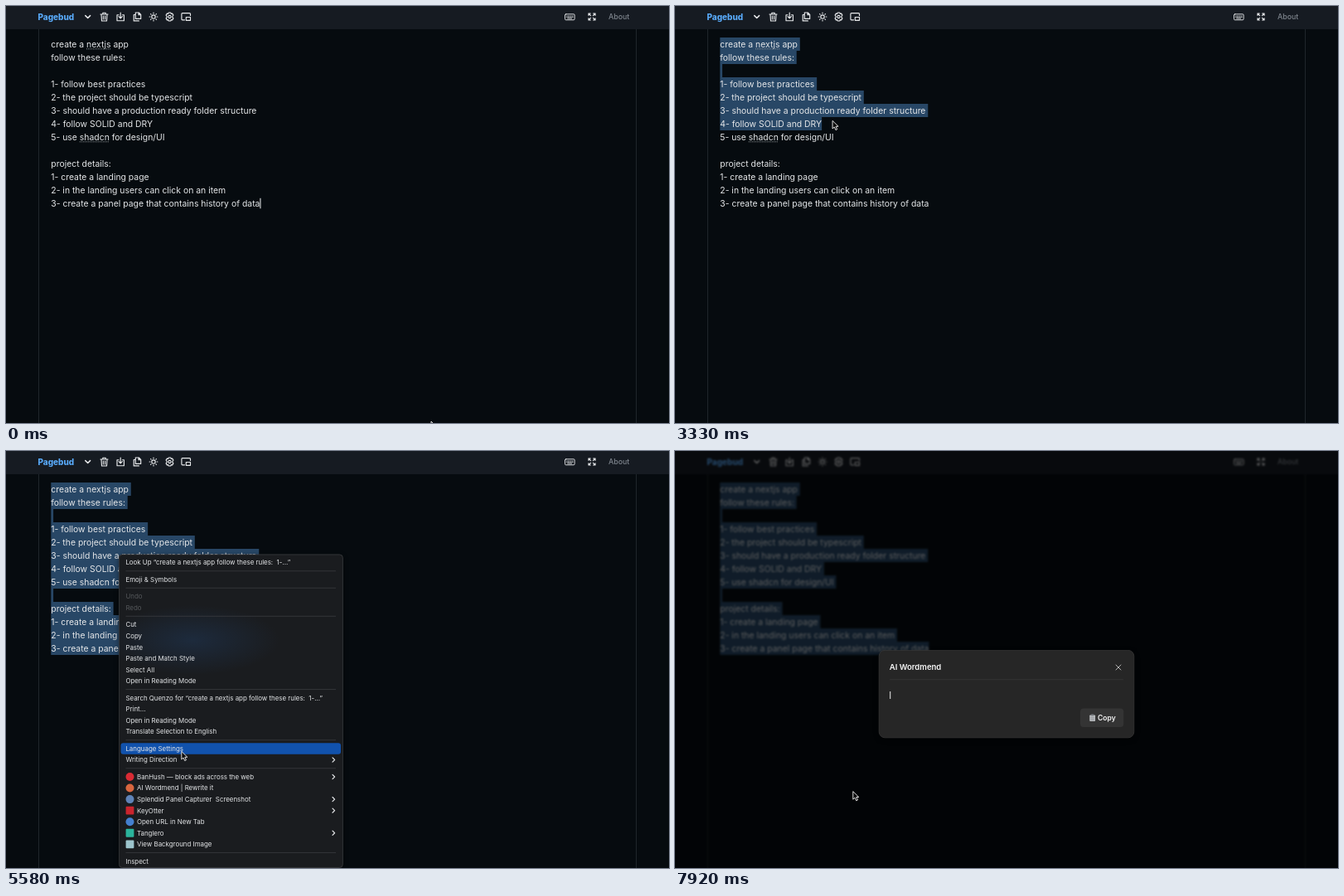
Recreate the animation shown at these times as an HTML page. Size 800 by 503 pixels, loop 8000 ms.

```html
<!DOCTYPE html>
<html lang="en">
<head>
<meta charset="utf-8">
<title>Notes</title>
<style>
  html, body { margin: 0; width: 100%; height: 100%; overflow: hidden; background: #060b0f; }
  svg, #dim { position: absolute; left: 0; top: 0; width: 800px; height: 503px; }
  #dim { background: rgba(0, 0, 0, .6); backdrop-filter: blur(1.2px); opacity: 0; }
  text { font-family: Inter, Roboto, sans-serif; white-space: pre; fill: #e4e6e8; }
  .note { font-size: 10.42px; }
  .item { font-size: 7.9px; }
  .off { fill: #54575a; }
  .brand { font-size: 10px; font-weight: 800; fill: #58a9f8; }
  .about { font-size: 8.8px; font-weight: 500; fill: #7d848c; }
  .title { font-size: 9.55px; font-weight: 600; fill: #f5f5f5; }
  .button { font-size: 8.6px; font-weight: 600; fill: #f2f2f2; }
  .icons, .chevron { fill: none; stroke: #e8eaec; stroke-width: 1.15; stroke-linecap: round; stroke-linejoin: round; }
  .panel { fill: #1a1c1f; stroke: #3b3e41; stroke-width: .8; filter: drop-shadow(0 2px 3px rgba(0, 0, 0, .45)); }
  .rule { stroke: #3a3c3f; stroke-width: .8; }
  .spell { stroke: #92979b; stroke-width: 1; stroke-dasharray: 1 1; }
</style>
</head>
<body>
<svg id="scene" viewBox="0 0 800 503">
  <defs>
    <radialGradient id="glow">
      <stop offset="0" stop-color="#20395a" stop-opacity=".5"/>
      <stop offset="1" stop-color="#20395a" stop-opacity="0"/>
    </radialGradient>
  </defs>
  <rect width="800" height="503" fill="#060b0f"/>
  <path d="M39.5 28V503M760.5 28V503" stroke="#20262b"/>
  <rect width="800" height="28" fill="#161b22"/>
  <text class="brand" x="38.5" y="16.7">Pagebud</text>
  <text class="about" x="727" y="16.2">About</text>
  <g class="icons">
    <path d="M95.8 11.6l2.9 2.9 2.9-2.9" stroke-width="1.5"/>
    <path d="M114 10h9M116.8 9.8V8.2h3.4v1.6M115 10l.5 8h6l.5-8M117.4 12v4M119.6 12v4"/>
    <path d="M136 10.7h-2v7h8.4v-7h-2M138.2 8v6.6M136 12.6l2.2 2.2 2.2-2.2"/>
    <path d="M156.3 8h4l2.4 2.4v5h-6.4zM160 8v2.7h2.7M154.2 10.5v7.4h6.2M156.3 10.5h-2.1"/>
    <circle cx="178" cy="13" r="2.2"/>
    <g id="rays"></g>
    <path d="M196.3 8h2.4l.5 1.4 1.5-.3 1.2 2-1 1.2v1.4l1 1.2-1.2 2-1.5-.3-.5 1.4h-2.4l-.5-1.4-1.5.3-1.2-2 1-1.2v-1.4l-1-1.2 1.2-2 1.5.3z"/>
    <circle cx="197.5" cy="13" r="1.6"/>
    <path d="M215.5 16.8h-2.6q-1 0-1-1V9.6q0-1 1-1h8.6q1 0 1 1v2M217.3 13.5h5.2v3.8h-5.2z"/>
    <rect x="674.5" y="9.8" width="11.6" height="7" rx="1.2" stroke-width=".9"/>
    <path d="M676.6 12h7.5M676.6 13.4h7.5" stroke-dasharray=".4 1.35" stroke-width=".9"/>
    <path d="M677.7 15h5" stroke-width=".9"/>
    <path d="M703 11.3V9h2.3M703 9l2.6 2.6M708.6 9h2.4v2.3M711 9l-2.6 2.6M703 14.7V17h2.3M703 17l2.6-2.6M711 14.7V17h-2.4M711 17l-2.6-2.6"/>
  </g>
  <g id="selection"></g>
  <g id="notes"></g>
  <g id="spelling"></g>
  <rect id="caret" width="1" height="12.5" fill="#f2f4f5"/>
  <g id="menu">
    <rect class="panel" x="136.4" y="124.9" width="270" height="377.6" rx="4"/>
    <ellipse cx="225" cy="228" rx="105" ry="42" fill="url(#glow)"/>
    <rect id="highlight" x="138.5" width="265.5" height="13.5" rx="3" fill="#1152ad"/>
    <g id="items"></g>
    <g id="keySub"></g>
    <g id="recordSub"></g>
  </g>
</svg>
<div id="dim"></div>
<svg viewBox="0 0 800 503">
  <g id="modal">
    <rect class="panel" x="246.2" y="240.4" width="307.6" height="105.4" rx="7" style="fill:#262626;stroke:#383838"/>
    <text class="title" x="258.7" y="264.2">AI Wordmend</text>
    <path d="M532 258l6 6M538 258l-6 6" stroke="#b0b0b0" stroke-linecap="round"/>
    <path d="M259 275.7H541" stroke="#353535" stroke-width=".8"/>
    <rect x="259.2" y="290" width="1" height="9" fill="#eee"/>
    <rect x="489" y="310.5" width="52.3" height="22.5" rx="4" fill="#343434"/>
    <rect x="500.3" y="318.4" width="6.8" height="7.6" rx=".8" fill="#b9bcbf"/>
    <rect x="502" y="317.4" width="3.4" height="2" rx=".6" fill="#777b80"/>
    <path d="M501.7 321.3h4M501.7 322.9h4M501.7 324.5h4" stroke="#85898d" stroke-width=".6"/>
    <text class="button" x="510" y="324.9">Copy</text>
  </g>
  <path id="cursor" d="M0 0V9.6L2.2 7.6L3.9 11.2L5.6 10.4L4 6.9H7Z" fill="#090909" stroke="#f4f4f4" stroke-width=".9" stroke-linejoin="round"/>
</svg>
<script>
const LOOP = 8000, FPS = 12;
const LEFT = 54.3, TOP = 38, LINE = 16;
const ROW = 13.55, GAP = 6.95;
const $ = id => document.getElementById(id);
const clamp = (v, lo = 0, hi = 1) => Math.min(hi, Math.max(lo, v));

function add(parent, tag, attrs, content = '') {
  const el = document.createElementNS('http://www.w3.org/2000/svg', tag);
  for (const key in attrs) el.setAttribute(key, attrs[key]);
  el.textContent = content;
  return parent.appendChild(el);
}

for (let i = 0; i < 8; i++) {
  add($('rays'), 'path', { d: 'M178 8.9V8.1', transform: `rotate(${i * 45} 178 13)` });
}

const lines = `create a nextjs app
follow these rules:

1- follow best practices
2- the project should be typescript
3- should have a production ready folder structure
4- follow SOLID and DRY
5- use shadcn for design/UI

project details:
1- create a landing page
2- in the landing users can click on an item
3- create a panel page that contains history of data`.split('\n').map((content, i) => {
  const y = TOP + i * LINE;
  const text = add($('notes'), 'text', { class: 'note', x: LEFT, y: y + 11.7 }, content);
  const word = content.match(/nextjs|shadcn/);
  if (word) {
    const x1 = text.getStartPositionOfChar(word.index).x;
    const x2 = text.getEndPositionOfChar(word.index + 5).x;
    add($('spelling'), 'line', { class: 'spell', x1, x2, y1: y + 13.8, y2: y + 13.8 });
  }
  return {
    width: content ? text.getComputedTextLength() : 0,
    mark: add($('selection'), 'rect', { x: LEFT, y, height: LINE, fill: '#284766' })
  };
});
const lastLine = lines.length - 1;

// null is a separator; each item is [label, options]
const quote = '“create a nextjs app follow these rules:  1-…”';
const items = [
  ['Look Up ' + quote], null, ['Emoji & Symbols'], null,
  ['Undo', { off: true }], ['Redo', { off: true }], null,
  ['Cut'], ['Copy'], ['Paste'], ['Paste and Match Style'], ['Select All'], ['Open in Reading Mode'], null,
  [`Search Quenzo for ${quote}`], ['Print…'], ['Open in Reading Mode'], ['Translate Selection to English'], null,
  ['Language Settings'], ['Writing Direction', { sub: true }], null,
  ['BanHush — block ads across the web', { sub: true, dot: '#d92b34' }],
  ['AI Wordmend | Rewrite it', { dot: '#d8663f' }],
  ['Splendid Panel Capturer  Screenshot', { sub: true, dot: '#5f83b8' }],
  ['KeyOtter', { sub: true, square: '#c9242d' }],
  ['Open URL in New Tab', { dot: '#4480d0' }],
  ['Tanglero', { sub: true, square: '#2bb49c' }],
  ['View Background Image', { square: '#9cc4cc' }], null,
  ['Inspect']
];
const rows = [];
let rowY = 134.5;
for (const item of items) {
  if (!item) {
    add($('items'), 'line', { class: 'rule', x1: 144.5, x2: 398, y1: rowY - 3.3, y2: rowY - 3.3 });
    rowY += GAP;
    continue;
  }
  const [label, { off, sub, dot, square } = {}] = item;
  if (dot) add($('items'), 'circle', { cx: 149.5, cy: rowY, r: 5, fill: dot });
  if (square) add($('items'), 'rect', { x: 144.6, y: rowY - 4.9, width: 9.8, height: 9.8, rx: 1, fill: square });
  add($('items'), 'text', { class: off ? 'item off' : 'item', x: dot || square ? 158 : 144.4, y: rowY + 2.9 }, label);
  if (sub) add($('items'), 'path', { class: 'chevron', d: `M394 ${rowY - 2.6}l2.6 2.6-2.6 2.6` });
  if (!off) rows.push(rowY);
  rowY += ROW;
}

function submenu(group, y, width, labels) {
  add(group, 'rect', { class: 'panel', x: 406.4, y: y - 10, width, height: labels.length * ROW + 6, rx: 4 });
  labels.forEach((label, i) => add(group, 'text', { class: 'item', x: 412.3, y: y + i * ROW + 2.9 }, label));
}
submenu($('recordSub'), 420.1, 69, ['Record Screen', 'Record Tab']);
submenu($('keySub'), 433.65, 116, ['Add Secure Item', 'Generate Secure Password', 'Save All Entered Data']);

// time, x, y of the pointer tip
const path = [
  [0, 513, 501], [80, 513, 501], [330, 300, 190], [500, 300, 190], [1580, 62, 50],
  [1750, 62, 50], [2080, 55, 42.5], [2667, 55, 42.5], [3333, 190, 138.3], [3417, 206, 160],
  [3900, 318, 238], [4250, 300, 222], [4850, 136, 128], [5083, 136, 128],
  [5583, 211.8, 362.3], [5900, 225, 435], [6200, 225, 435], [6667, 216, 412.8],
  [6750, 214.8, 410.6], [LOOP, 214.8, 410.6]
];
function pointerAt(t) {
  const i = Math.max(1, path.findIndex(p => p[0] >= t));
  const [t0, x0, y0] = path[i - 1], [t1, x1, y1] = path[i];
  const k = (t - t0) / (t1 - t0);
  return { x: x0 + (x1 - x0) * k, y: y0 + (y1 - y0) * k };
}

const show = (id, on) => { $(id).style.display = on ? '' : 'none'; };

function drawSelection(t) {
  const active = t > 2660, all = t >= 3900;
  const drag = pointerAt(Math.min(t, 3900));
  const current = all ? lastLine : clamp(Math.floor((drag.y - TOP) / LINE), 0, lastLine);
  lines.forEach(({ width, mark }, i) => {
    const partial = all ? width : clamp(drag.x - LEFT, 0, width);
    const shown = i < current ? width + 2.8 : i === current ? partial : 0;
    mark.setAttribute('width', active ? shown : 0);
  });
}

function drawCaret(t) {
  const clicked = t > 2240;
  const blinkOn = Math.floor((t + 420) / 500) % 2 === 0;
  show('caret', clicked ? t < 2660 : blinkOn);
  $('caret').setAttribute('x', clicked ? LEFT : LEFT + lines[lastLine].width);
  $('caret').setAttribute('y', TOP + 1.8 + (clicked ? 0 : lastLine * LINE));
}

function drawMenu(t, { x, y }) {
  show('menu', t > 4990 && t < 7240);
  $('menu').style.opacity = clamp((7250 - t) / 170);
  const row = rows.find(r => Math.abs(y + 1 - r) <= ROW / 2);
  show('highlight', row && x > 138);
  if (row) $('highlight').setAttribute('y', row - 6.75);
  show('keySub', t > 5900 && t < 6350);
  show('recordSub', t > 6490 && t < 6740);
}

function frame(now) {
  const t = Math.floor((now % LOOP + 4) * FPS / 1000) * 1000 / FPS % LOOP;
  const pointer = pointerAt(t);
  $('cursor').setAttribute('transform', `translate(${pointer.x} ${pointer.y})`);
  drawSelection(t);
  drawCaret(t);
  drawMenu(t, pointer);
  show('spelling', t < 3420);
  $('dim').style.opacity = $('modal').style.opacity = clamp((t - 7583) / 333);
  requestAnimationFrame(() => frame(performance.now()));
}
frame(performance.now());
</script>
</body>
</html>
```
